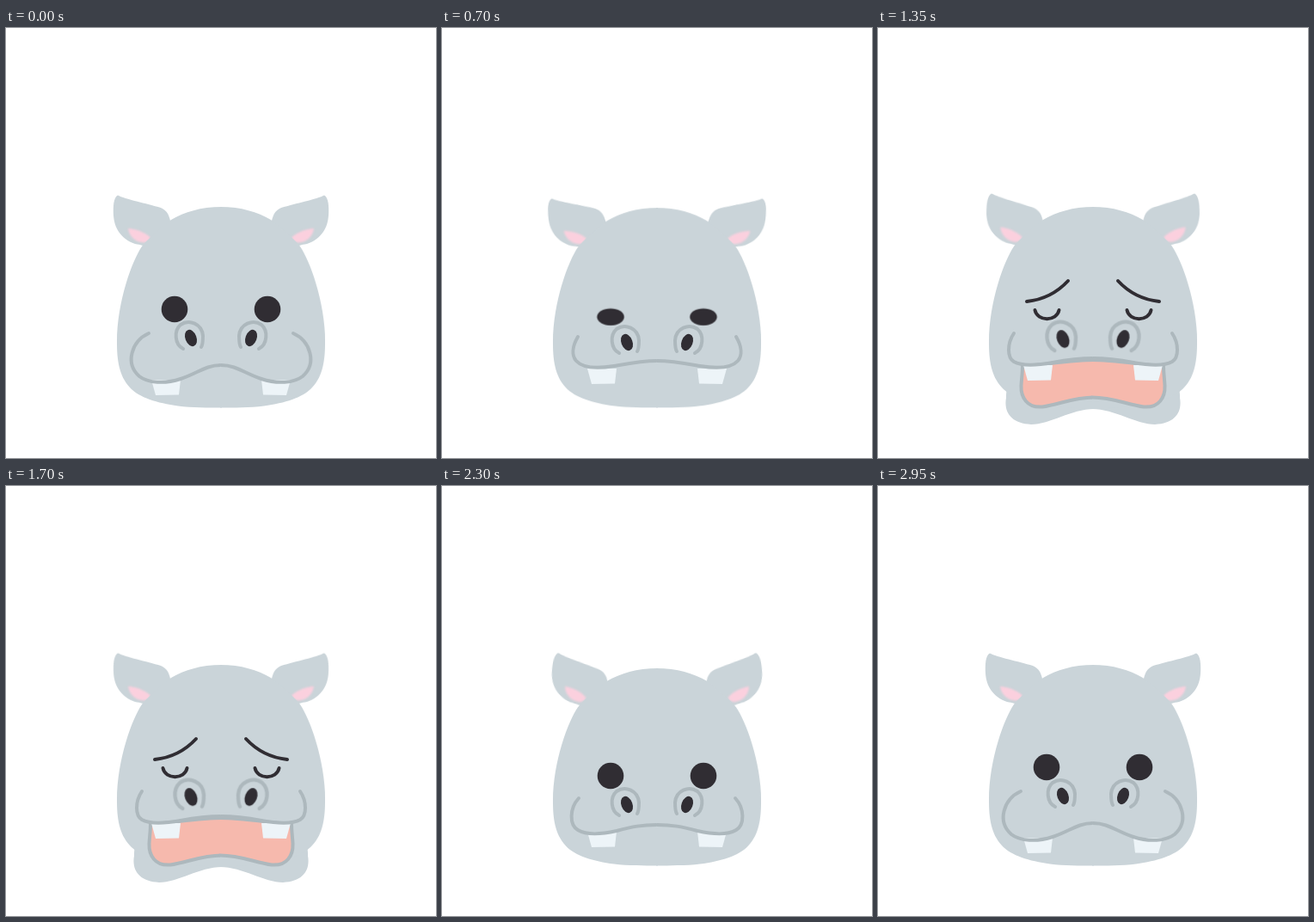
Write an HTML page that moves like this. It is 500x500 px and loops after 3 s.

```html
<!DOCTYPE html>
<html lang="en">
<head>
<meta charset="utf-8">
<title>Yawning hippo</title>
<style>
  html, body { margin: 0; width: 100%; height: 100%; overflow: hidden; background: #fff; }
  svg { display: block; width: 100%; height: 100%; }
  svg * { animation: 3s linear infinite; }

  .skin { fill: #cad4d9; }
  .line { fill: none; stroke: #adb8bd; stroke-width: 4; stroke-linecap: round; }
  .dark { fill: #302d33; }
  .ink { fill: none; stroke: #302d33; stroke-width: 4; stroke-linecap: round; }
  .pink { fill: #fbd0de; filter: blur(1px); }
  .tooth { fill: #edf4f8; animation-name: tooth; }
  .gape { fill: #f6b9ad; stroke: #adb8bd; stroke-width: 4; stroke-linecap: round; animation-name: gape; }

  .top { transform-origin: 250px 441px; animation-name: squash; }
  .ear { transform-origin: 175px 240px; animation-name: ear; }
  .jaw { animation-name: jaw; }
  .lip { animation-name: lip; }
  .nose { transform-origin: 214px 359px; animation-name: nose; }
  .eye { transform-origin: 196px 327px; animation-name: eye; }
  .tired { animation-name: tired; }

  @keyframes squash {
    0%, 12%, 31%, 63%, 90%, 100% { transform: none; }
    19% { transform: scaleY(.983); }
    23.33% { transform: scaleY(.995); }
    74%, 77% { transform: scaleY(.983); }
  }
  @keyframes ear {
    0%, 61.67%, 88%, 100% { transform: none; }
    3.5% { transform: rotate(-4deg); }
    7.5% { transform: rotate(4deg); }
    11.67% { transform: rotate(.5deg); }
    18% { transform: rotate(-4deg); }
    23.33% { transform: rotate(-3.2deg); }
    33.33%, 36% { transform: rotate(5deg); }
    54% { transform: rotate(.4deg); }
    70% { transform: rotate(8deg); }
    76.67% { transform: rotate(6.4deg); }
  }
  @keyframes jaw {
    0%, 24%, 72%, 100% { transform: translateY(-28px); }
    33.33%, 61.67% { transform: none; }
  }
  @keyframes tooth {
    0%, 12%, 90%, 100% { transform: translateY(17px); }
    19% { transform: translateY(10px); }
    23.33% { transform: translateY(4px); }
    33.33%, 61.67% { transform: none; }
    76.67% { transform: translateY(10px); }
  }
  @keyframes nose {
    0%, 12%, 90%, 100% { transform: none; }
    19% { transform: translateY(10px); }
    23.33% { transform: translateY(5px); }
    33.33%, 61.67% { transform: translateY(1px) scale(1.07); }
    74%, 77% { transform: translateY(10px); }
  }
  @keyframes eye {
    0%, 12%, 90%, 100% { transform: none; opacity: 1; }
    19% { transform: translateY(10px); }
    23.33% { transform: translateY(9px) scale(1.03, .65); }
    26.6% { transform: translateY(8px) scale(1.03, .15); opacity: 1; }
    26.67%, 67.9% { transform: translateY(8px) scale(1.03, .15); opacity: 0; }
    68% { transform: translateY(8px) scale(1.03, .15); opacity: 1; }
    74%, 77% { transform: translateY(10px); opacity: 1; }
  }
  @keyframes tired {
    0%, 26.6%, 68%, 100% { transform: translateY(5px); opacity: 0; }
    26.67%, 67.9% { transform: translateY(5px); opacity: 1; }
    32%, 62% { transform: none; opacity: 1; }
  }
  @keyframes lip {
    0%, 12%, 90%, 100% { d: path("M166 355C146 364 138 390 155 405C165 413 185 414 203 408C222 402 232 392 250 392"); }
    19%, 74%, 77% { d: path("M159 363C148 375 148 394 158 400C168 406 185 405 203 401C222 396 232 394 250 394"); }
    23.33% { d: path("M158 359C151 371 151 381 156 387C164 396 182 396 200 393C217 390 232 387 250 387"); }
    33.33%, 61.67% { d: path("M158 355C150 367 150 383 158 388C167 393 186 392 203 389C219 386 232 384 250 384"); }
  }
  @keyframes gape {
    0%, 23.9%, 71.67%, 100% {
      d: path("M251 387C225 387 196 393 178 393C178 393 178 393 178 393C180 395 184 395 190 394C208 393 225 388 251 388");
      opacity: 0;
    }
    24%, 71.6% {
      d: path("M251 387C225 387 196 393 178 393C178 393 178 393 178 393C180 395 184 395 190 394C208 393 225 388 251 388");
      opacity: 1;
    }
    33.33%, 61.67% {
      d: path("M251 386C225 386 190 392 168 393C168 401 167 407 166.5 416C166 429 173 442 191 440.5C210 438 227 429.5 251 429.5");
      opacity: 1;
    }
  }
</style>
</head>
<body>
<svg viewBox="0 0 500 500">
  <g id="left">
    <path class="skin jaw" d="M251 443C225 443 200 461 178 461C155 460 146 447 149 430C149 422 150 415 155 405H251Z"/>
    <g class="top">
      <g class="ear">
        <path class="skin" d="M130 194.500C138 199 164 204 180 209C187 212 189.500 217 191 224L200 245L165 255C160 253 157 252 150 251C133 245 126 232 125 218C124.500 207 125 197 130 194.500Z"/>
        <path class="pink" d="M142 233C152 234 163 238 168 244C165 250 160 250.500 153 248C147 245 143 240 142 233Z"/>
      </g>
      <path class="skin" d="M251 208C226 208 208 214 192 223C176 236 165 245 158 254C147 270 129 318 129 365C129 385 131 404 144 418C155 430 176 436 200 439.500C216 441.500 236 441.500 251 441.500Z"/>
    </g>
    <path class="gape"/>
    <path class="tooth" d="M169 392H203L201 409.500L174 410Z"/>
    <path class="line lip"/>
    <g class="nose">
      <path class="line" d="M206 373C196 368 195 352 203 345C213 338 228 344 229 358C229 364 229 368 227 371"/>
      <ellipse class="dark" cx="215" cy="360.500" rx="6.500" ry="10" transform="rotate(-21 215 360.500)"/>
    </g>
    <circle class="dark eye" cx="196" cy="327" r="15.300"/>
    <g class="tired">
      <path class="ink" d="M173 318C192 316 208 308 221 294"/>
      <path class="ink" d="M182.500 328C185 341.500 208 341.500 210.500 328"/>
    </g>
  </g>
  <g id="right" transform="matrix(-1 0 0 1 500 0)"></g>
</svg>
<script>
  // The face is symmetric: the right half mirrors the left.
  const half = id => document.getElementById(id);
  half("right").innerHTML = half("left").innerHTML;
</script>
</body>
</html>
```
